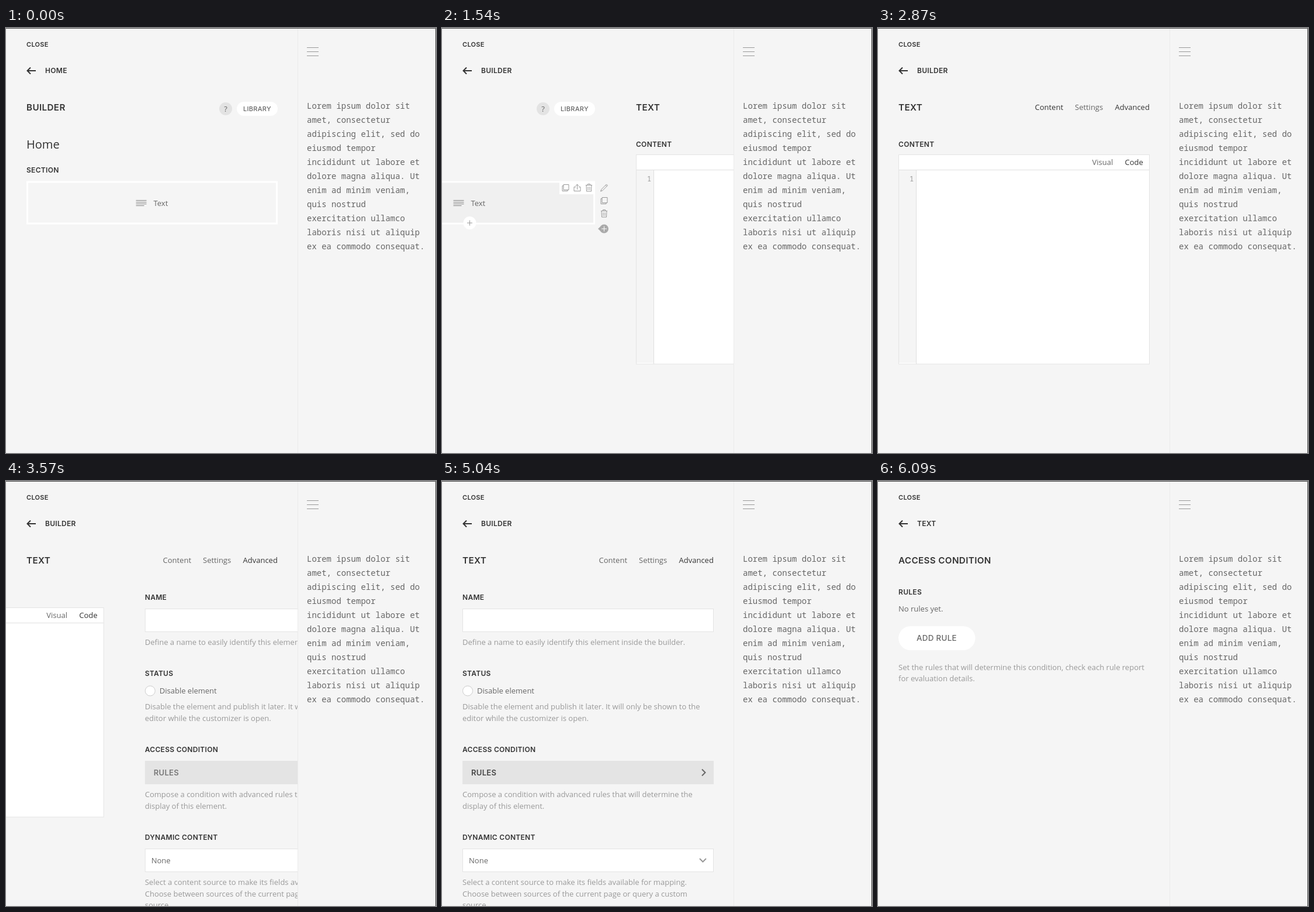
These frames come from a looping animation (736x726 px, 7.07 s). An HTML page:

```html
<!DOCTYPE html>
<html lang="en">
<head>
<meta charset="utf-8">
<title>Builder panel</title>
<style>
  html, body { margin: 0; width: 100%; height: 100%; overflow: hidden; background: #f5f5f5; }
  svg { display: block; }
  text { font: 13px "Open Sans", sans-serif; fill: #666; white-space: pre; }
  .cap { font: 600 12px Inter, sans-serif; letter-spacing: .025em; fill: #333; }
  .title { font-size: 15.2px; }
  .small { font-size: 11px; }
  .btn { font-weight: 500; fill: #666; text-anchor: middle; }
  .help { fill: #999; }
  .mono { font: 300 14px "Noto Sans Mono", monospace; fill: #666; }
  .line { fill: none; stroke: #999; }
  .bold { fill: none; stroke: #333; stroke-width: 2; }
  .box { fill: #fff; stroke: #e4e4e4; }
  .white { fill: #fff; }
</style>
</head>
<body>
<svg width="736" height="726" viewBox="0 0 736 726">
  <defs>
    <g id="copy" class="line"><path d="M-3.5 -5.5h9v9h-9zM-3.5 -3.5h-2v9h9v-2"/></g>
    <g id="trash" class="line"><path d="M-5.5 -4.5h11M-2 -4.5v-2h4v2M-4.5 -4.5l.5 10.5h8l.5 -10.5M-1.5 -2v6M1.5 -2v6"/></g>
    <g id="share" class="line"><path d="M-2.5 -1.5h-3v7h11v-7h-3M0 3v-9M-3 -3l3 -3 3 3"/></g>
    <g id="pencil" class="line"><path d="M-6 6l1.5 -3.5 8.5 -8.5 2 2 -8.500 8.500zM2.500 -4.500l2 2"/></g>
  </defs>

  <!-- sidebar -->
  <svg width="499" height="726">
    <g id="home">
      <text class="cap title" x="35" y="141">BUILDER</text>
      <circle cx="376" cy="138" r="11" fill="#e3e3e3"/>
      <text x="376" y="143" text-anchor="middle" fill="#888">?</text>
      <rect class="white" x="395" y="126" width="70" height="24" rx="12"/>
      <text class="cap small btn" x="430" y="142">LIBRARY</text>
      <text x="35" y="206" style="font-size:20px;fill:#333">Home</text>
      <text class="cap" x="35" y="247">SECTION</text>
      <rect x="36.500" y="263" width="427" height="71" fill="none" stroke="#fff" stroke-width="3"/>
      <g class="hover">
        <rect x="38" y="264.500" width="424" height="68" fill="#f0f0f0"/>
        <rect class="white" x="404" y="262" width="61" height="22"/>
        <use href="#copy" x="414.500" y="273"/>
        <use href="#share" x="434.500" y="273"/>
        <use href="#trash" x="454.500" y="273"/>
        <use href="#pencil" x="480.500" y="273"/>
        <use href="#copy" x="480.500" y="295"/>
        <use href="#trash" x="480.500" y="317"/>
        <path d="M470 343l6 -5.500v11z" fill="#aaa"/>
        <circle cx="480.500" cy="343" r="7.500" fill="#aaa"/>
        <path d="M476 343h9M480.500 338.500v9" stroke="#fff"/>
        <circle class="white" cx="250.500" cy="333" r="11"/>
        <path class="line" d="M246 333h9M250.500 328.500v9"/>
      </g>
      <path class="line" style="stroke:#808080" d="M222.500 294.500h18M222.500 297.500h18M222.500 300.500h18M222.500 303.500h14"/>
      <text x="252.500" y="304">Text</text>
    </g>

    <g id="element">
      <text class="cap title" x="35" y="141">TEXT</text>
      <text id="tabContent" x="268.500" y="140">Content</text>
      <text x="337" y="140">Settings</text>
      <text id="tabAdvanced" x="405.500" y="140">Advanced</text>

      <g id="content">
        <text class="cap" x="35" y="203">CONTENT</text>
        <rect class="box" x="35.500" y="216.500" width="429" height="357.500"/>
        <rect x="36" y="243" width="29" height="329" fill="#f5f5f5"/>
        <path class="line" style="stroke:#e0e0e0" d="M36 242.500h428M65.500 243v331"/>
        <text id="visual" x="366.500" y="234">Visual</text>
        <text x="422.500" y="234" style="fill:#333">Code</text>
        <text class="mono" x="54" y="262" style="font-size:12px;fill:#999">1</text>
      </g>

      <g id="advanced">
        <text class="cap" x="35" y="203">NAME</text>
        <rect class="box" x="35.500" y="218.500" width="429" height="39"/>
        <text class="help" x="35" y="280">Define a name to easily identify this element inside the builder.</text>
        <text class="cap" x="35" y="333">STATUS</text>
        <circle cx="44" cy="358.500" r="8.500" fill="#fff" stroke="#ccc"/>
        <text x="60" y="363">Disable element</text>
        <text class="help" x="35" y="390">Disable the element and publish it later. It will only be shown to the</text>
        <text class="help" x="35" y="410">editor while the customizer is open.</text>
        <text class="cap" x="35" y="463">ACCESS CONDITION</text>
        <rect x="35" y="478" width="430" height="40" fill="#e4e4e4"/>
        <text id="rules" class="cap" x="50" y="502.500" style="font-size:13px">RULES</text>
        <path class="bold" style="stroke:#666" d="M445 492.500l5.500 5.500 -5.500 5.500"/>
        <text class="help" x="35" y="540">Compose a condition with advanced rules that will determine the</text>
        <text class="help" x="35" y="560">display of this element.</text>
        <text class="cap" x="35" y="613">DYNAMIC CONTENT</text>
        <rect class="box" x="35.500" y="628.500" width="429" height="39"/>
        <text x="46" y="653">None</text>
        <path class="bold" style="stroke:#999" d="M441 645l5.500 5.500 5.500 -5.500"/>
        <text class="help" x="35" y="690">Select a content source to make its fields available for mapping.</text>
        <text class="help" x="35" y="710">Choose between sources of the current page or query a custom</text>
        <text class="help" x="35" y="729">source.</text>
      </g>
    </g>

    <g id="access">
      <text class="cap title" x="35" y="141">ACCESS CONDITION</text>
      <text class="cap" x="35" y="194">RULES</text>
      <text x="35" y="223">No rules yet.</text>
      <rect class="white" x="35" y="248" width="131.500" height="41" rx="20.500"/>
      <text class="cap btn" x="100.500" y="273" style="font-size:13.300px">ADD RULE</text>
      <text class="help" x="35" y="323">Set the rules that will determine this condition, check each rule report</text>
      <text class="help" x="35" y="342">for evaluation details.</text>
    </g>

    <text class="cap small" x="35" y="32">CLOSE</text>
    <path class="bold" d="M51 73h-14M42 67.500l-5.500 5.500 5.500 5.500"/>
    <text id="back" class="cap" x="67" y="77"></text>
  </svg>

  <!-- preview -->
  <path d="M499.500 0v726" stroke="#ebebeb"/>
  <path class="line" d="M515 33.500h20M515 40.500h20M515 47.500h20"/>
  <g id="preview"></g>
  <path d="M0 .5h735.500v725.500" fill="none" stroke="#444"/>
</svg>

<script>
const LOOP = 7070, STEP = 70, SLIDE = 225, WIDTH = 500;
const $ = id => document.getElementById(id);

const lorem = `Lorem ipsum dolor sit
amet, consectetur
adipiscing elit, sed do
eiusmod tempor
incididunt ut labore et
dolore magna aliqua. Ut
enim ad minim veniam,
quis nostrud
exercitation ullamco
laboris nisi ut aliquip
ex ea commodo consequat.`;
$('preview').innerHTML = lorem.split('\n')
  .map((s, i) => `<text class="mono" x="515" y="${138 + 24 * i}">${s}</text>`).join('');

const clamp = v => Math.min(1, Math.max(0, v));
const bezier = (s, a, b) => 3 * s * (1 - s) ** 2 * a + 3 * s * s * (1 - s) * b + s ** 3;

// CSS "ease", solved by bisection
function ease(x) {
  if (x <= 0 || x >= 1) return clamp(x);
  let lo = 0, hi = 1;
  for (let i = 0; i < 24; i++) {
    const mid = (lo + hi) / 2;
    if (bezier(mid, .25, .25) < x) lo = mid; else hi = mid;
  }
  return bezier(lo, .1, 1);
}

const move = (id, x) => $(id).setAttribute('transform', `translate(${x} 0)`);
const tint = (id, color) => $(id).style.fill = color;
const active = on => on ? '#333' : '#666';

function draw(now) {
  const t = Math.floor(now % LOOP / STEP) * STEP;
  const slide = start => WIDTH * ease((t - start) / SLIDE);
  const open = slide(1484), tab = slide(3492.6), rules = slide(5779);

  move('home', -open);
  move('element', WIDTH - open - rules);
  move('content', -tab);
  move('advanced', WIDTH - tab);
  move('access', WIDTH - rules);

  document.querySelector('.hover').style.opacity = clamp((t - 350) / 210);
  $('back').textContent = t < 1540 ? 'HOME' : t < 5810 ? 'BUILDER' : 'TEXT';
  tint('visual', active(t === 2380));
  tint('tabContent', active(t < 3430));
  tint('tabAdvanced', active(t >= 2870));
  tint('rules', t < 4970 ? '#777' : t < 5040 ? '#5c5c5c' : '#444');
}

const begin = performance.now();
function tick() {
  draw(performance.now() - begin);
  requestAnimationFrame(tick);
}
tick();
</script>
</body>
</html>
```
